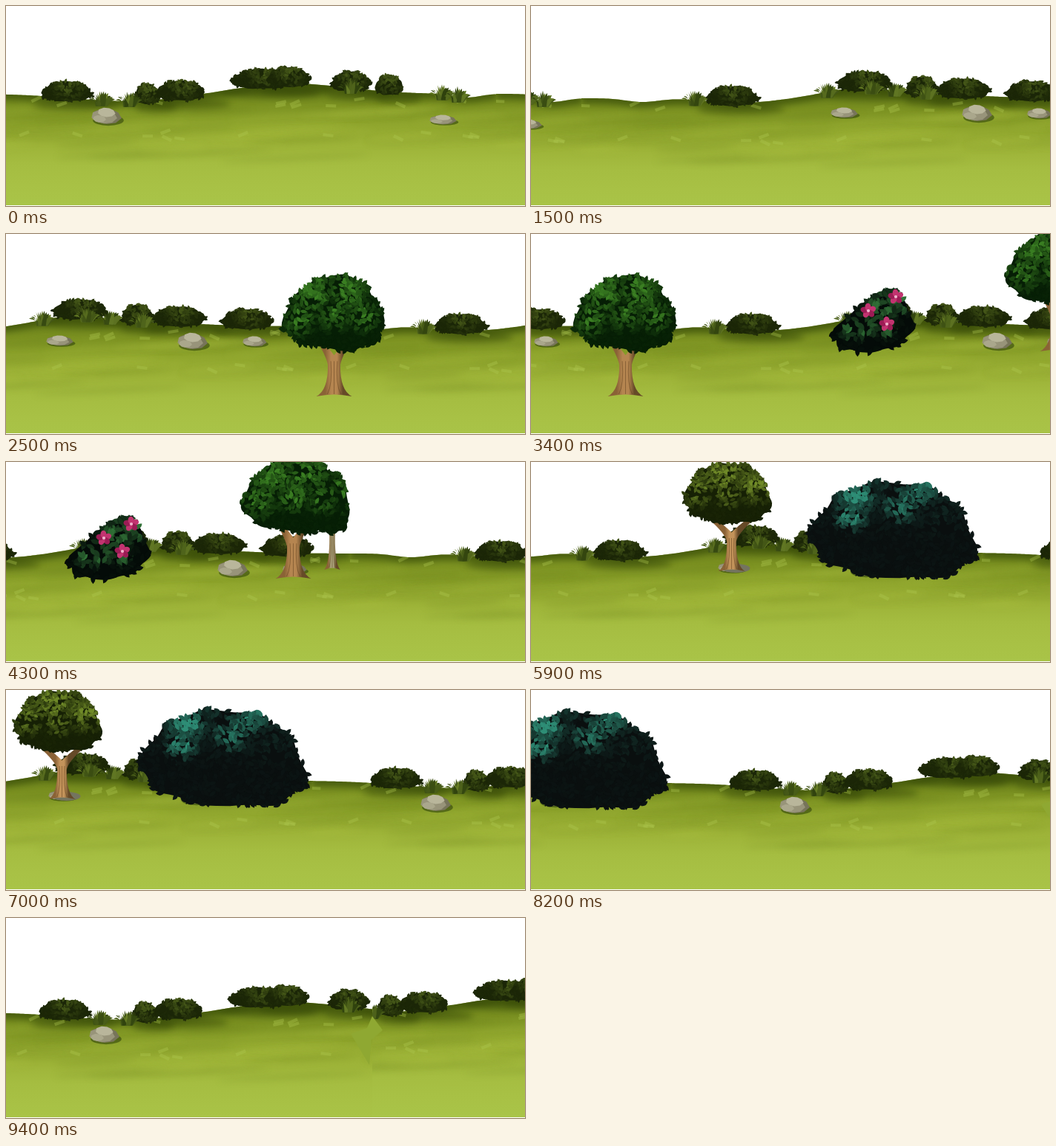
Recreate the animation shown at these times as an HTML page with a canvas. Size 700x271 px, loop 9.5 s.

```html
<!DOCTYPE html>
<html>
<head>
<meta charset="utf-8">
<style>
html, body { margin: 0; height: 100%; overflow: hidden; background: #fff; }
canvas { display: block; }
</style>
</head>
<body>
<canvas id="stage" width="700" height="270"></canvas>
<script>
const LOOP = 9500, STEP = 100, TILE = 692, LEFT = -31, PAD = 20, SEAM = 3265;
const view = document.getElementById('stage').getContext('2d');
const world = document.createElement('canvas');
world.width = 3540;
world.height = 320;
const g = world.getContext('2d');
g.translate(-LEFT, PAD);

let seed = 7;
const rand = () => (seed = seed * 16807 % 2147483647) / 2147483647;
const mix = (a, b, t) => `rgb(${a.map((v, i) => Math.round(v + (b[i] - v) * t))})`;
const bump = (x, centre, width) => Math.exp(-(((x - centre) / width) ** 2) / 2);

function at(x, y, draw) {
  g.save();
  g.translate(x, y);
  draw();
  g.restore();
}

function ellipse(x, y, rx, ry, fill, turn = 0) {
  g.fillStyle = fill;
  g.beginPath();
  g.ellipse(x, y, rx, ry, turn, 0, 7);
  g.fill();
}

function poly(points, fill) {
  g.fillStyle = fill;
  g.beginPath();
  points.forEach(p => g.lineTo(...p));
  g.fill();
}

function leaf(x, y, size, turn, fill) {
  const dx = Math.cos(turn) * size * .7, dy = Math.sin(turn) * size * .7;
  g.fillStyle = fill;
  g.beginPath();
  g.moveTo(x - dx, y - dy);
  g.quadraticCurveTo(x - dy, y + dx, x + dx, y + dy);
  g.quadraticCurveTo(x + dy, y - dx, x - dx, y - dy);
  g.fill();
}

// A rounded box of leaves, narrower at the top. Lights are [u, v, radius] relative to the box.
function leafy({ x = 0, y, w, h, taper = .3, lean = 0, tilt = 0, dark, light, size, lights }) {
  const soften = v => Math.sign(v) * Math.abs(v) ** .75;
  const point = (a, r) => {
    const k = r * (1 + .035 * Math.cos(9 * a + w));
    const u = soften(Math.cos(a)) * k, v = soften(Math.sin(a)) * k;
    return [x + w / 2 * u * (1 + taper * Math.min(0, v - .2)) - lean * v, y + h / 2 * v + tilt * u * (1 + v) / 2, v];
  };
  poly(Array.from({ length: 90 }, (_, i) => point(i * Math.PI / 45, .96).slice(0, 2)), mix(dark, light, 0));
  const leaves = w * h * 1.7 / size ** 2;
  for (let i = 0; i < leaves; i++) {
    const [px, py, v] = point(rand() * 6.283, Math.sqrt(rand()) * .98);
    const glow = Math.max(0, ...lights.map(([lu, lv, r]) =>
      1 - Math.hypot(px - x - lu * w / 2, py - y - lv * h / 2) / (r * h)));
    const shade = Math.min(1, glow * (.35 + rand()) + Math.max(0, .2 - v) * rand() * .25 + rand() * .04);
    leaf(px, py, size, rand() * 3.14, mix(dark, light, shade));
  }
}

function bush(x, w, base) {
  leafy({ x, y: base - 14, w, h: 28, dark: [27, 38, 7], light: [68, 86, 24], size: 5, lights: [[.1, -.5, .9]] });
}

function tuft(x, base) {
  for (let i = 0; i < 13; i++) {
    const k = (i * 5 % 13) / 6 - 1;
    const tx = x + k * 18, ty = base - 22 * (1 - .55 * k * k) * (.8 + rand() * .2);
    g.fillStyle = mix([44, 62, 12], [104, 126, 38], rand());
    g.beginPath();
    g.moveTo(x + k * 5 - 3, base);
    g.quadraticCurveTo(x + k * 8 - 2, base - 15, tx, ty);
    g.quadraticCurveTo(x + k * 10 + 3, base - 8, x + k * 5 + 3, base);
    g.fill();
  }
}

function rock(x, y, w, h) {
  const facet = (cx, cy, scale, fill) => poly(Array.from({ length: 9 }, (_, i) => {
    const a = i * .698 + .2, r = scale * (.47 + .04 * Math.cos(i * 5));
    return [x + w * (cx + Math.cos(a) * r), y + h * (cy + Math.sin(a) * r)];
  }), fill);
  ellipse(x + w * .6, y + h * .75, w * .52, h * .3, 'rgba(40,60,8,.55)');
  facet(.55, .52, 1, '#77745a');
  facet(.46, .54, .88, '#98947a');
  facet(.54, .3, .6, '#b9b69b');
  facet(.3, .66, .45, '#aaa78c');
}

// Ridge height by position; bushes are [centre, width], tufts are centres.
const hillA = {
  ridge: x => 119 + 10 * bump(x, 165, 75) - 14 * bump(x, 385, 75) + 5 * bump(x, 622, 18),
  bushes: [[82, 72], [190, 36], [235, 70], [344, 84], [381, 62], [465, 56], [517, 40]],
  tufts: [129, 166, 465, 588, 609],
  rocks: [[114, 137, 40, 24], [570, 147, 36, 14]]
};
const hillB = {
  ridge: x => 119 + 5 * bump(x, 51, 22) + 6 * bump(x, 185, 45) - 12 * bump(x, 340, 45) - 5 * bump(x, 440, 70),
  bushes: [[172, 74], [351, 78], [428, 45], [484, 75], [576, 74]],
  tufts: [122, 300, 360, 391, 434],
  rocks: [[304, 131, 36, 15], [481, 127, 40, 24], [569, 132, 32, 15]]
};

function hill({ ridge, bushes, tufts, rocks }) {
  const outline = () => {
    g.beginPath();
    for (let x = LEFT; x <= LEFT + TILE + 1; x += 3) g.lineTo(x, ridge(x));
  };
  seed = 31;
  g.save();
  outline();
  g.lineTo(LEFT + TILE + 1, 300);
  g.lineTo(LEFT, 300);
  const soil = g.createLinearGradient(0, 105, 0, 270);
  ['#5f7517', '#7a9021', '#8fa52d', '#9db338', '#a5bd41', '#a8c145', '#a9c448']
    .forEach((tone, i) => soil.addColorStop(i / 6, tone));
  g.fillStyle = soil;
  g.fill();
  g.clip();
  g.filter = 'blur(5px)';
  outline();
  g.strokeStyle = 'rgba(58,78,8,.75)';
  g.lineWidth = 14;
  g.stroke();
  bushes.forEach(([x, w]) => ellipse(x + 12, ridge(x) + 9, w * .8, 8, 'rgba(48,64,6,.45)'));
  g.filter = 'blur(4px)';
  for (let i = 0; i < 34; i++) {
    const x = rand() * TILE + LEFT, y = 138 + rand() * 78, r = 40 + rand() * 90;
    const fill = i % 2 ? 'rgba(100,122,24,.18)' : 'rgba(178,200,72,.2)';
    [-TILE, 0, TILE].forEach(d => ellipse(x + d, y, r, 2 + rand() * 3, fill, -.05));
  }
  g.filter = 'none';
  g.strokeStyle = 'rgba(176,200,80,.35)';
  for (let i = 0; i < 26; i++) {
    const x = rand() * 680 + LEFT, y = (i % 2 ? 128 : 172) + rand() * 10;
    g.beginPath();
    g.moveTo(x, y);
    g.lineTo(x + rand() * 4 - 2, y - 4);
    g.stroke();
  }
  g.restore();
  bushes.forEach(([x, w]) => bush(x, w, ridge(x) + 5));
  tufts.forEach(x => tuft(x, ridge(x) + 8));
  rocks.forEach(r => rock(...r));
}

// A flared trunk that forks into two branches.
function trunk(w, h, spread, tone) {
  const bark = g.createLinearGradient(-w * .6, 0, w * .6, 0);
  ['#8a6236', tone, tone, '#664a28'].forEach((c, i) => bark.addColorStop(i / 3, c));
  g.fillStyle = bark;
  g.beginPath();
  g.moveTo(-w * 1.2, 0);
  g.quadraticCurveTo(-w * .4, -h * .15, -w * .42, -h * .8);
  g.quadraticCurveTo(-w * .5, -h, -spread, -h * 1.42);
  g.lineTo(5 - spread, -h * 1.5);
  g.quadraticCurveTo(-w * .1, -h * 1.1, 0, -h * 1.05);
  g.quadraticCurveTo(w * .1, -h * 1.1, spread - 5, -h * 1.5);
  g.lineTo(spread, -h * 1.42);
  g.quadraticCurveTo(w * .5, -h, w * .42, -h * .8);
  g.quadraticCurveTo(w * .4, -h * .15, w * 1.2, 0);
  g.quadraticCurveTo(0, -5, -w * 1.2, 0);
  g.fill();
  g.strokeStyle = 'rgba(84,54,24,.45)';
  for (let k = -1; k <= 1; k++) {
    g.beginPath();
    g.moveTo(k * w * .45, -3);
    g.quadraticCurveTo(k * w * .1, -h * .3, k * w * .22, -h * .9);
    g.stroke();
  }
}

const green = { dark: [6, 30, 5], light: [58, 126, 34], size: 7 };

function oak() {
  trunk(20, 53, 23, '#b58550');
  leafy({ ...green, y: -114, w: 145, h: 104, taper: .34, lean: 5, tilt: 8,
    lights: [[-.4, -.5, .36], [-.65, .15, .3], [.25, -.55, .34], [0, .05, .28], [.55, .1, .26]] });
}

function paleTree() {
  trunk(9, 56, 4, '#aaa27a');
  leafy({ ...green, y: -92, w: 48, h: 88, lights: [[.2, -.3, .4]] });
}

function forkTree() {
  ellipse(6, -4, 19, 6, '#74745f');
  trunk(15, 50, 31, '#c3935a');
  leafy({ x: -5, y: -106, w: 123, h: 84, taper: .25, tilt: 3, dark: [22, 32, 5], light: [112, 138, 40], size: 6,
    lights: [[-.1, -.6, .5], [-.7, -.1, .35], [.6, -.25, .38], [0, .1, .25]] });
}

function flowerBush() {
  leafy({ y: 0, w: 112, h: 86, taper: .55, lean: 17, dark: [4, 11, 8], light: [48, 112, 54], size: 9,
    lights: [[-.65, .25, .22], [-.3, .15, .28], [.1, -.4, .32], [.25, .3, .18], [.55, -.6, .25]] });
  for (const [x, y] of [[-12, -14], [25, -33], [13, 4]]) {
    for (let i = 0; i < 5; i++) {
      const a = i * 1.257 - .4;
      ellipse(x + Math.cos(a) * 5.5, y + Math.sin(a) * 5, 5.2, 4, i % 2 ? '#9c1c55' : '#c23470', a);
    }
    ellipse(x, y, 2.2, 2, '#f0b4cc');
  }
}

function thicket() {
  leafy({ y: 0, w: 236, h: 134, taper: .26, tilt: 9, dark: [10, 15, 15], light: [46, 142, 118], size: 8,
    lights: [[-.42, -.68, .24], [-.48, -.28, .2], [.1, -.48, .2], [.3, -.8, .2]] });
}

for (let k = 0; k < 5; k++) at(k * TILE, 0, () => hill(k % 4 ? hillB : hillA));

// The last stretch is cut over to a fresh hill along a seam.
g.save();
g.beginPath();
g.rect(SEAM, -PAD, 400, 340);
g.clip();
g.clearRect(SEAM, -PAD, 400, 340);
at(3099, -9, () => hill(hillA));
g.restore();
poly([[SEAM, 124], [SEAM + 14, 143], [SEAM - 1, 156], [SEAM - 4, 190], [SEAM - 29, 148], [SEAM - 7, 140]], '#8fa832');

at(1385.5, 214, oak);
at(1725, 112, flowerBush);
at(2021, 141, paleTree);
at(1968.5, 153, oak);
at(2399.5, 144, forkTree);
at(2617, 88, thicket);

// Camera: time, distance, drop.
const camera = [[0, 0, 0], [1500, 593, 6], [3400, 1258.5, 6], [4300, 1581.5, 5],
  [5700, 2094, 4], [7000, 2324.5, 4], [9400, 2771, 9]];

function frame() {
  const t = Math.floor(performance.now() % LOOP / STEP) * STEP;
  const i = Math.max(1, camera.findIndex(key => key[0] >= t));
  const [t0, x0, y0] = camera[i - 1], [t1, x1, y1] = camera[i];
  const f = (t - t0) / (t1 - t0);
  view.clearRect(0, 0, 700, 270);
  view.drawImage(world, Math.round(LEFT - x0 - (x1 - x0) * f), Math.round(y0 + (y1 - y0) * f) - PAD);
  requestAnimationFrame(frame);
}
frame();
</script>
</body>
</html>
```
